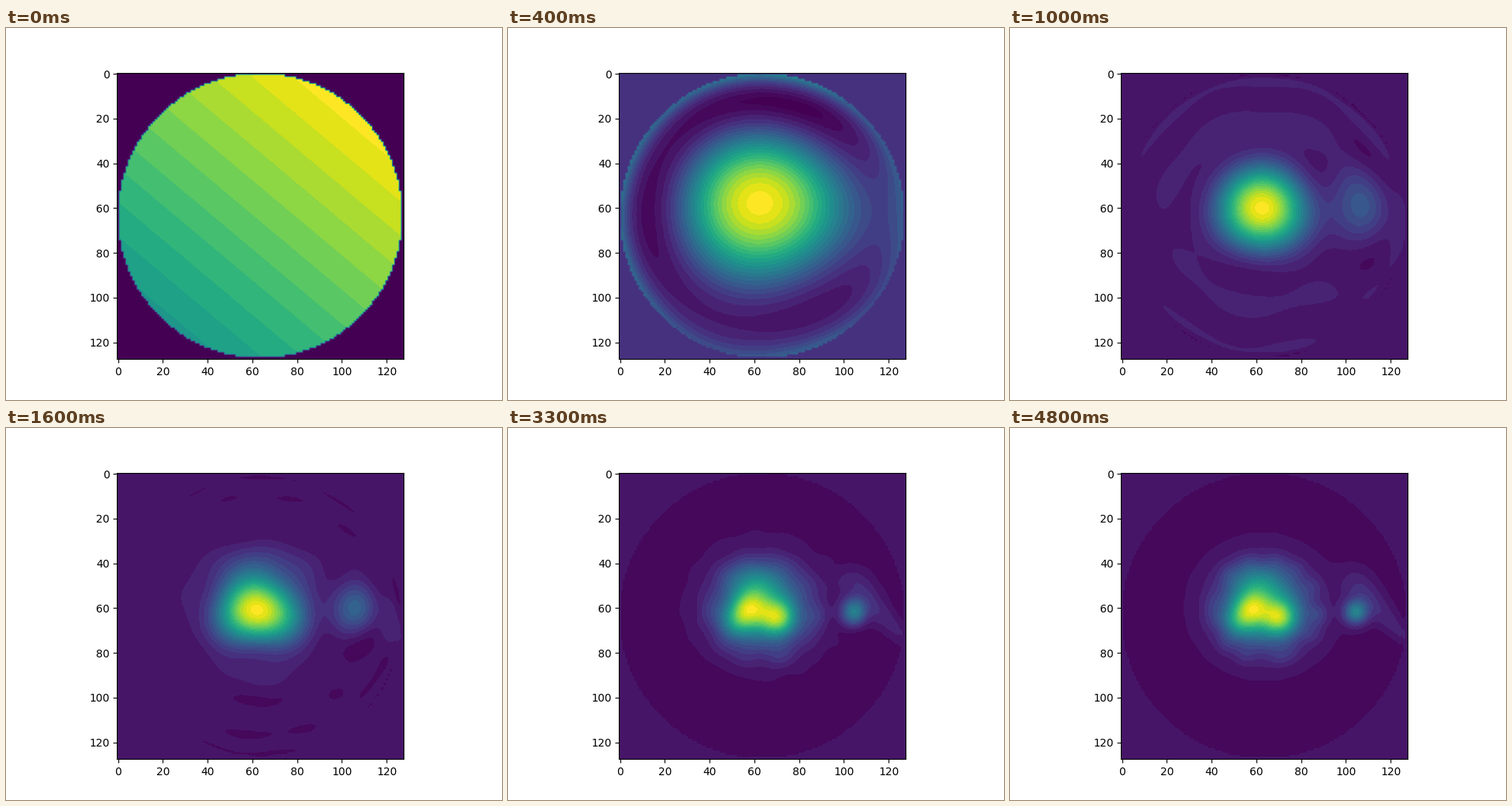
A matplotlib script for the animation above (4.9 s loop, 640 by 480 pixels).

```python
import numpy as np
import matplotlib.pyplot as plt
from matplotlib.animation import FuncAnimation
from matplotlib.colors import ListedColormap

SIZE = 128
ORDERS = 49

axis = np.linspace(-1, 1, SIZE)
gx, gy = np.meshgrid(axis, axis)
disk = np.hypot(gx, gy) <= 1
r = np.hypot(gx, gy)[disk]
turn = np.exp(1j * np.arctan2(gy, gx)[disk])
py, px = np.mgrid[:SIZE, :SIZE]


def blob(amp, x, y, sx, sy=None):
    sy = sy or sx
    return amp * np.exp(-((px - x) / sx) ** 2 / 2 - ((py - y) / sy) ** 2 / 2)


def galaxy():
    """Double core in a halo with a rough rim, a companion and a tail."""
    image = blob(0.5, 64, 61, 13, 11.5) + blob(0.04, 62, 56, 20)
    image += blob(0.2, 60, 48, 9, 6)

    # bright bar: left foot, left knot, right knot
    for amp, x, y in [(0.26, 52, 66), (0.36, 58, 60), (0.42, 70.5, 64.5)]:
        image += blob(amp, x, y, 5.2)

    # ragged rim
    rng = np.random.default_rng(4)
    for a in np.linspace(0, 2 * np.pi, 14) + rng.uniform(-0.15, 0.15, 14):
        image += blob(0.04, 64 + 24 * np.cos(a), 61 + 22 * np.sin(a), 2.8)

    # companion and the tail that passes it
    image += blob(0.4, 104.4, 62, 3.8)
    for s in np.linspace(0, 1, 9):
        image += blob(0.04, 103 + 23 * s, 48 + 25 * s, 5.5 - 3 * s)
    return image


def reconstructions(image):
    """Zernike partial sums of the image for orders 1 to ORDERS."""
    values = image[disk]
    area = (2 / (SIZE - 1)) ** 2
    spin = [turn ** m for m in range(ORDERS + 1)]
    older, old = {}, {0: np.ones_like(r)}
    total = np.full_like(r, values.sum() * area / np.pi)
    sums = []
    for n in range(1, ORDERS + 1):
        new = {}
        for m in range(n % 2, n + 1, 2):
            radial = (r * (old[abs(m - 1)] + old.get(m + 1, 0))
                      - older.get(m, 0))
            new[m] = radial
            moment = np.sum(values * radial * spin[m].conj()) * area
            weight = (n + 1) / np.pi * (2 if m else 1)
            total = total + weight * radial * (moment * spin[m]).real
        older, old = old, new
        frame = np.zeros((SIZE, SIZE))
        # the sky sinks slightly below zero at high orders
        frame[disk] = total - 0.027 * np.clip((n - 24) / 8, 0, 1)
        sums.append(frame)
    return sums


def banded_viridis():
    levels = np.r_[0, 0.022, 0.055, np.linspace(0.1, 1, 22)]
    steps = np.linspace(0, 1, 256)
    nearest = np.abs(steps[:, None] - levels).argmin(axis=1)
    return ListedColormap(plt.get_cmap("viridis")(levels[nearest]))


frames = reconstructions(galaxy())

fig, ax = plt.subplots(figsize=(6.4, 4.8), dpi=100)
picture = ax.imshow(frames[0], cmap=banded_viridis())


def update(i):
    data = frames[i]
    low = min(data.min(), -0.05 * data.max()) if i else 0
    picture.set_data(data)
    picture.set_clim(low, data.max())
    return [picture]


anim = FuncAnimation(fig, update, frames=ORDERS, interval=100, repeat=True,
                     repeat_delay=0)
plt.show()
```
